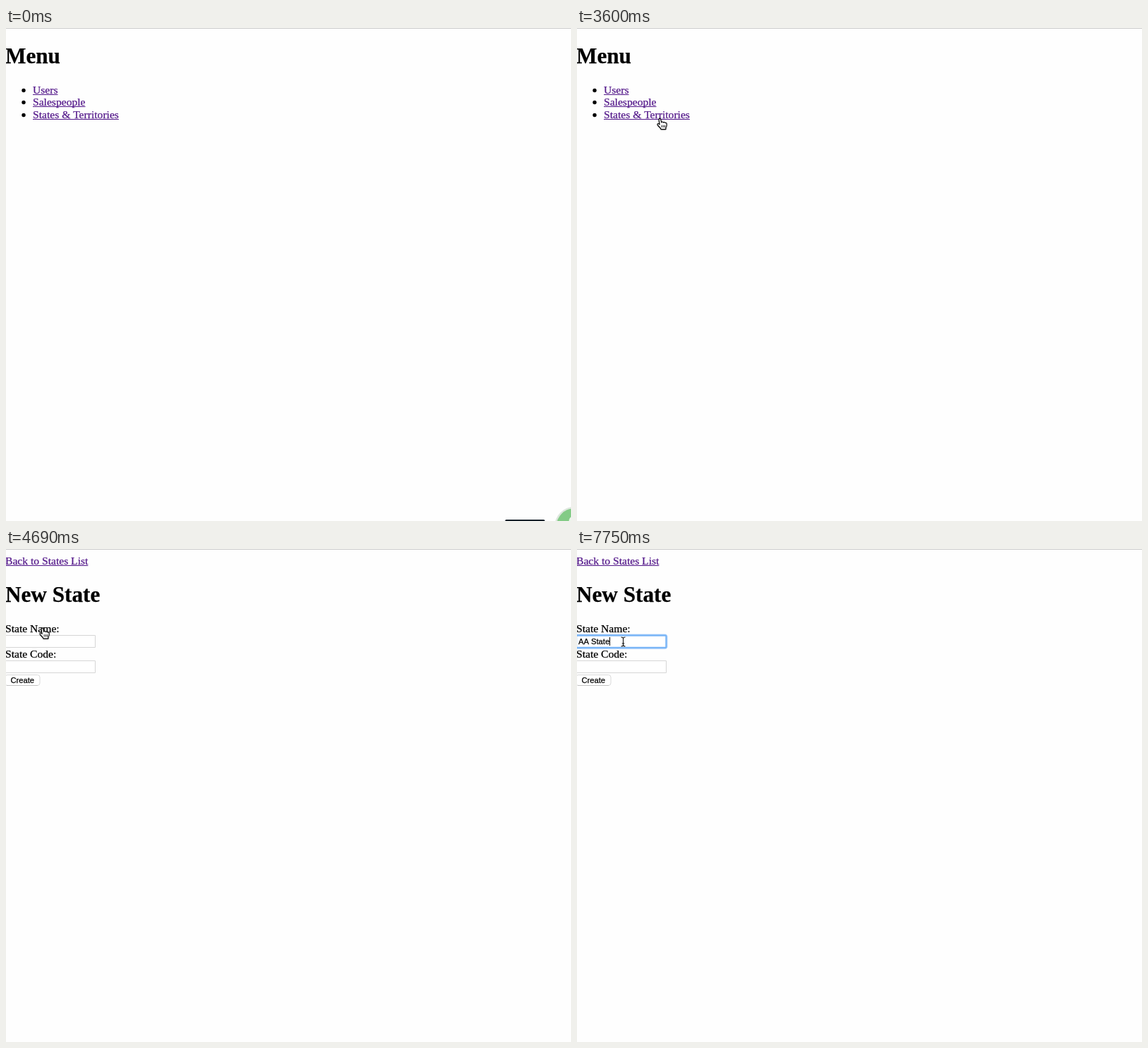
An HTML page with a canvas for the animation above (8 s loop, 801 by 699 pixels).

```html
<!DOCTYPE html>
<html lang="en">
<head>
<meta charset="utf-8">
<title>States admin</title>
<style>
html, body { margin: 0; width: 100%; height: 100%; overflow: hidden; background: #fefefe; }
canvas { display: block; }
</style>
</head>
<body>
<canvas id="stage" width="801" height="699"></canvas>
<script>
const ctx = document.getElementById('stage').getContext('2d');
const LOOP = 8000;
const BG = '#fefefe', INK = '#000', VISITED = '#551a8b', FRESH = '#0000ee', ACTIVE = '#ee0000';
const SERIF = '"Liberation Serif", "Times New Roman", serif';
const BODY = '15.6px ' + SERIF, BOLD = 'bold ' + BODY, HEAD = 'bold 31.2px ' + SERIF;
const FIELD = '11.2px "Liberation Sans", Arial, sans-serif';
const OPTION = '600 13px Inter, "Liberation Sans", sans-serif';

const STATES = `A New State:NS, A Newer State:WH, A State:AS, Alabama:AL, Alaska:AK,
  Arizona:AZ, Arkansas:AR, British Columbia:BC, California:CA, Colorado:CO,
  Connecticut:CT, Delaware:DE, Florida:FL, Georgia:GA, Hawaii:HI, Idaho:ID,
  Illinois:IL, Indiana:IN, Iowa:IA, Kansas:KS, Kentucky:KY, Louisiana:LA,
  Maine:ME, Maryland:MD, Massachusetts:MA`.split(',').map(s => s.trim().split(':'));
const SHOWN = ['GA', 'IN'], EDITED = ['AS', 'AL', 'AK', 'BC', 'IN'];
const HINTS = ['Alabama', 'Alabam', 'A State', 'A New State', 'A Newer State', 'ADASD'];

const PRESS = 90;
const T = { pressMenu: 3505, list: 3685, leave: 3945, pressAdd: 4505, form: 4685,
  beam: 4955, focus: 5440, blink: 5980 };
const TYPED = [[6240, 'A'], [6510, 'AA'], [7050, 'AA '], [7230, 'AA S'],
  [7490, 'AA St'], [7580, 'AA Sta'], [7660, 'AA Stat'], [7750, 'AA State']];

// Pointer moves: start, end, steps, from, to, easing power
const MOVES = [
  [2210, 2470, 3, [686, 464], [197.5, 295], 1.2],
  [2563, 2980, 5, [197.5, 295], [118, 135], 1.5],
  [2980, 3330, 4, [118, 135], [118.5, 129], 1.3],
  [3860, 4390, 6, [118.5, 129], [52.5, 112.5], 1.4],
  [4870, 5350, 5, [52.5, 112.5], [65.5, 131.5], 1.4]
];

// The thin outline gives the slightly heavier look of smoothed type
function text(str, x, y, font = BODY, color = INK, align = 'left') {
  ctx.font = font;
  ctx.fillStyle = ctx.strokeStyle = color;
  ctx.textAlign = align;
  ctx.lineWidth = 0.25;
  ctx.fillText(str, x, y);
  ctx.strokeText(str, x, y);
}

function link(str, x, y, color = VISITED) {
  text(str, x, y, BODY, color);
  ctx.fillRect(x, y + 1, ctx.measureText(str).width, 1);
}

function pressable(t, start) {
  return t >= start && t < start + PRESS ? ACTIVE : VISITED;
}

function box(x, y, w, h, r, fill, stroke, line = 1) {
  ctx.beginPath();
  ctx.roundRect(x, y, w, h, r);
  if (fill) { ctx.fillStyle = fill; ctx.fill(); }
  if (stroke) { ctx.strokeStyle = stroke; ctx.lineWidth = line; ctx.stroke(); }
}

function disc(x, y, r, fill) {
  ctx.beginPath();
  ctx.arc(x, y, r, 0, Math.PI * 2);
  ctx.fillStyle = fill;
  ctx.fill();
}

function menuPage(t) {
  text('Menu', -1, 50, HEAD);
  ['Users', 'Salespeople', 'States & Territories'].forEach((label, i) => {
    const y = Math.round(92.7 + i * 17.55);
    disc(25, y - 4.5, 2.7, INK);
    link(label, 38, y, i === 2 ? pressable(t, T.pressMenu) : VISITED);
  });
  if (t < 200) badge(t < 60 ? 1 : 0.45);
}

function badge(alpha) {
  ctx.globalAlpha = alpha;
  box(707.5, 697, 56.5, 8, 2, '#172029');
  disc(805, 706, 27, '#dde6dd');
  disc(805, 706, 24.5, '#83cb86');
  disc(805, 699, 7, '#e9f6e9');
  ctx.globalAlpha = 1;
}

function listPage(t) {
  link('Back to Menu', -1, 22);
  text('States', -1, 75, HEAD);
  link('Add a State', -1, 118, pressable(t, T.pressAdd));
  text('Name', 166.5, 156, BOLD, INK, 'center');
  text('Code', 360, 156, BOLD, INK, 'center');
  STATES.forEach(([name, code], i) => {
    const y = Math.round(177.3 + i * 21.45);
    text(name, 2, y);
    text(code, 335, y);
    link('Show', 389, y, i < 10 || SHOWN.includes(code) ? VISITED : FRESH);
    link('Edit', 444, y, EDITED.includes(code) ? VISITED : FRESH);
  });
}

function formPage(t) {
  link('Back to States List', -1, 22);
  text('New State', -1, 75, HEAD);
  text('State Name:', -1, 118);
  text('State Code:', -1, 154);
  box(-1.5, 122.5, 128, 17, 0, '#fff', '#d6d6d6');
  box(-1.5, 158.5, 128, 17, 0, '#fff', '#d6d6d6');
  box(-1.5, 178.5, 49.5, 15, 3.5, '#fff', '#d9d9d9');
  ctx.fillStyle = '#c2c2c2';
  ctx.fillRect(1, 193, 44, 1);
  text('Create', 6.5, 190, FIELD);
  if (t >= T.focus) focusedField(t);
}

function focusedField(t) {
  const entry = TYPED.filter(([at]) => t >= at).pop();
  const value = entry ? entry[1] : '';
  box(-1, 122.5, 127.5, 17.5, 2, null, 'rgba(120,180,250,.3)', 4.5);
  box(-1, 122.5, 127.5, 17.5, 1.5, '#fff', '#79b5f6', 2.4);
  if (value === 'A') {
    box(-1.5, 141.5, 128, 141, 0, '#fff', '#9cc3ee');
    HINTS.forEach((hint, i) => text(hint, 8, Math.round(158.7 + i * 23.4), OPTION));
  }
  text(value, 2, 135, FIELD);
  if (value || t < T.blink) {
    const x = Math.round(1.7 + ctx.measureText(value).width);
    ctx.fillRect(x, 125, 1, 12);
  }
}

const ARROW = new Path2D('M0 0V14L3.2 11.1L5.3 15.8L7.6 14.8L5.5 10.3H9.7Z');
const HAND = new Path2D('M3.9 9.6L2.9 3.2C2.6 .7 5 .4 5.5 2.5L6.5 6.6C7 5.4 8.9 5.6 9.2 6.9' +
  'C9.8 5.9 11.5 6.2 11.8 7.5C12.6 6.8 14 7.4 14 8.8C14.3 11.2 13.6 12.8 12.7 14.3V16.4H5.9' +
  'C5.7 14.6 2.8 12.8 1.1 10.4C.1 8.8 1.8 7.8 2.9 8.7Z');
const CREASES = new Path2D('M7 10.5V13.8M9.2 10.5V13.8M11.3 10.5V13.8');
const BEAM = new Path2D('M-3 -6.5Q0 -6.5 0 -4.5Q0 -6.5 3 -6.5M0 -5V5M-3 6.5Q0 6.5 0 4.5Q0 6.5 3 6.5M-1.8 2.5H1.8');

function stroke(path, color, width) {
  ctx.strokeStyle = color;
  ctx.lineWidth = width;
  ctx.stroke(path);
}

function shadow(on) {
  ctx.shadowColor = on ? 'rgba(0,0,0,.4)' : 'transparent';
  ctx.shadowBlur = on ? 2 : 0;
  ctx.shadowOffsetY = on ? 1 : 0;
}

const POINTERS = {
  arrow() {
    shadow(true);
    stroke(ARROW, '#fff', 2);
    shadow(false);
    ctx.fillStyle = INK;
    ctx.fill(ARROW);
  },
  hand() {
    ctx.translate(-5.3, -1.8);
    shadow(true);
    ctx.fillStyle = '#fff';
    ctx.fill(HAND);
    shadow(false);
    stroke(HAND, INK, 1.2);
    stroke(CREASES, INK, 0.9);
  },
  beam() {
    stroke(BEAM, '#fff', 2.6);
    stroke(BEAM, '#111', 1.1);
  }
};

function pointerShape(t, x, y) {
  if (t >= T.beam) return 'beam';
  const overLink = t < T.leave ? y < 132 : x < 72;
  return overLink ? 'hand' : 'arrow';
}

function pointer(t) {
  const move = MOVES.filter(m => t >= m[0]).pop();
  if (!move) return;
  const [start, end, steps, from, to, power] = move;
  const step = Math.floor((t - start) / (end - start) * steps + 0.001);
  const p = 1 - Math.pow(1 - Math.min(1, step / steps), power);
  const x = from[0] + (to[0] - from[0]) * p;
  const y = from[1] + (to[1] - from[1]) * p;
  ctx.save();
  ctx.translate(x, y);
  ctx.lineJoin = 'round';
  POINTERS[pointerShape(t, x, y)]();
  ctx.restore();
}

function draw(t) {
  ctx.fillStyle = BG;
  ctx.fillRect(0, 0, 801, 699);
  ctx.fillStyle = '#cbcbcb';
  ctx.fillRect(0, 0, 801, 1);
  if (t < T.list) menuPage(t);
  else if (t < T.form) listPage(t);
  else formPage(t);
  pointer(t);
}

const born = performance.now();
function tick() {
  draw((performance.now() - born) % LOOP);
  requestAnimationFrame(tick);
}
tick();
</script>
</body>
</html>
```
